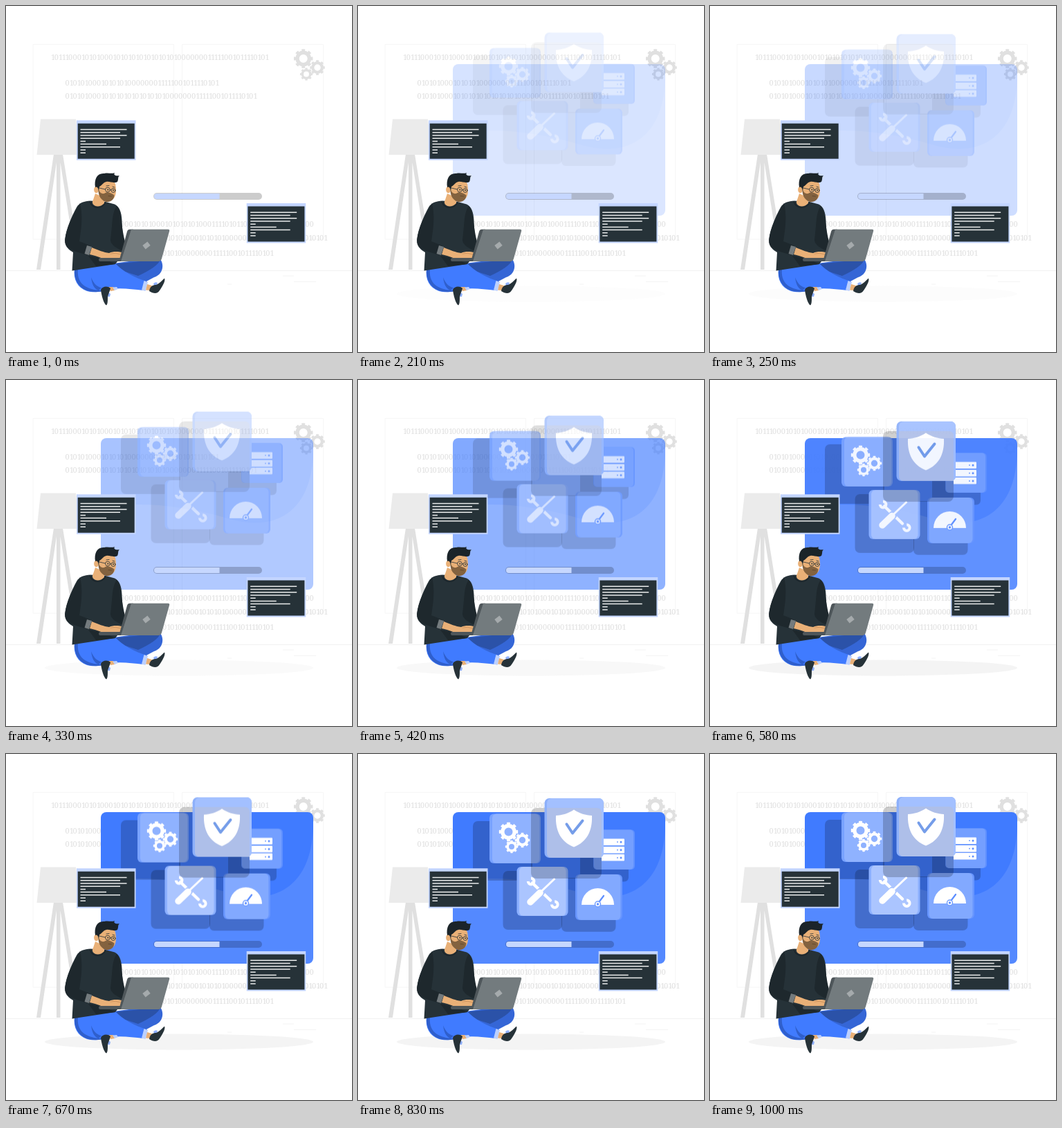
An HTML page that plays this animation: 500x500 px, repeating every 1.04 s.

```html
<!DOCTYPE html>
<html lang="en">
<head>
<meta charset="utf-8">
<title>Developer at work</title>
<style>
  html, body { margin: 0; width: 100%; height: 100%; overflow: hidden; background: #fff; }
  svg { display: block; width: 100%; height: 100%; }
  .fade { animation: fade 1040ms infinite; }
  .drop { animation: drop 1040ms infinite; }
  .fade, .drop { animation-timing-function: cubic-bezier(.3475, .072, .499, 1.369); }
  @keyframes fade {
    0% { opacity: 0; }
    92.98%, 100% { opacity: 1; }
  }
  @keyframes drop {
    0% { opacity: 0; transform: translateY(-30px); }
    92.98%, 100% { opacity: 1; transform: none; }
  }
  .bits { font: 300 11px "Noto Serif", serif; fill: #e0e0e0; }
  .ink { fill: #263238; }
  .skin { fill: #e9b077; }
  .line { fill: none; stroke-linecap: round; stroke-linejoin: round; }
  .shade { fill: #000; opacity: .2; }
</style>
</head>
<body>
<svg viewBox="0 0 500 500">
  <defs>
    <!-- outer radius 13.8, hole radius 6 -->
    <g id="gear" fill="none">
      <circle r="8.7" stroke-width="5.4"/>
      <circle r="12.200" stroke-width="3.200" pathLength="16" stroke-dasharray="1 1" transform="rotate(-11.250)"/>
    </g>
    <g id="terminal">
      <path fill="#c3d5ff" d="M0 0H85.500V57.500H0Z"/>
      <path class="ink" d="M1.700 4.500H83.700V55.500H1.700Z"/>
      <path stroke="#e9ebeb" stroke-width="1.500" d="M5.500 13.300h67M5.500 17.500h57.500M5.500 21.700h67M5.500 26h57.500M5.500 30.200h7.500M5.500 34.400h37.500M5.500 38.600h57.500M5.500 42.800h7.500M5.500 47h7.500"/>
    </g>
    <clipPath id="screen"><rect x="137" y="84" width="307" height="219" rx="8"/></clipPath>
  </defs>

  <!-- room -->
  <g fill="none" stroke="#f6f6f6">
    <path d="M39 55.500H242.500V337H39ZM254.500 55.500H458.500V337H254.500Z"/>
    <path stroke="#ebebeb" stroke-width=".7" d="M0 382.500H500"/>
    <path stroke="#f4f4f4" d="M400 390h16M416 398.500h32M320 402h6"/>
  </g>
  <g id="bits" class="bits"></g>
  <g stroke="#e0e0e0">
    <use href="#gear" transform="translate(429.700 76)"/>
    <use href="#gear" transform="translate(450 89) scale(.78)"/>
    <use href="#gear" transform="translate(434 98.500) scale(.66)"/>
  </g>
  <path fill="#e0e0e0" d="M69 214H82L109 381H103L78.500 226V381H73V226L50 381H44Z"/>
  <path fill="#ebebeb" d="M50 163.500H101L106.500 215H44.500Z"/>

  <g class="fade">
    <ellipse cx="250" cy="416" rx="194" ry="11.500" fill="#f4f4f4"/>
    <g clip-path="url(#screen)">
      <path fill="#407bff" d="M137 84H444V303H137Z"/>
      <path fill="#fff" opacity=".1" d="M137 187C185 174 250 180 320 200C385 220 441 195 444 105V303H137Z"/>
    </g>
  </g>

  <g class="drop">
    <!-- settings -->
    <rect class="shade" x="166" y="95" width="86" height="86" rx="7"/>
    <rect x="190" y="84.500" width="74" height="71.500" rx="6" fill="#78a2ff"/>
    <rect x="194" y="84.500" width="68" height="71.500" rx="6" fill="#8fb2ff"/>
    <g stroke="#fff">
      <use href="#gear" transform="translate(217.500 110.500)"/>
      <use href="#gear" transform="translate(237.500 122.500) scale(.78)"/>
      <use href="#gear" transform="translate(222 132) scale(.67)"/>
    </g>

    <!-- server -->
    <rect class="shade" x="321" y="113" width="70" height="69.500" rx="6"/>
    <rect x="340" y="107.500" width="60" height="57.500" rx="5" fill="#5f90ff"/>
    <rect x="341" y="107.500" width="57" height="57.500" rx="5" fill="#749fff"/>
    <path fill="#fff" d="M352 120.500h32q1 0 1 1v7.500q0 1-1 1h-32zm0 11.500h32q1 0 1 1v7.500q0 1-1 1h-32zm0 11h32q1 0 1 1v7.500q0 1-1 1h-32z"/>
    <path class="line" stroke="#5f90ff" stroke-width="3" d="M380 125.200h.01M380 136.700h.01M380 148h.01"/>
    <path class="line" stroke="#5f90ff" stroke-width="1.800" d="M375 125.200h.01M375 136.700h.01M375 148h.01"/>

    <!-- gauge -->
    <rect class="shade" x="294" y="177" width="78.500" height="78" rx="7"/>
    <rect x="314" y="172" width="68" height="66" rx="6" fill="#6795ff"/>
    <rect x="316.500" y="172" width="63" height="66" rx="6" fill="#82a9ff"/>
    <path fill="#fff" d="M323 216a23.500 24 0 0 1 47 0z"/>
    <path class="line" stroke="#5d8eff" stroke-width="2.200" d="M347.500 213L355 203"/>
    <circle cx="346.500" cy="215" r="4" fill="#fff" stroke="#6f9cff" stroke-width="1.500"/>
    <circle cx="346.500" cy="215" r="1.700" fill="#5d8eff"/>

    <!-- tools -->
    <rect class="shade" x="209.500" y="167" width="85.500" height="85" rx="7"/>
    <rect x="229.500" y="161" width="74" height="71" rx="6" fill="#8cb0ff"/>
    <rect x="233" y="161" width="67.500" height="71" rx="6" fill="#abc5ff"/>
    <g class="line" stroke="#fff">
      <path stroke-width="4.500" d="M252 184.500L278 209.500"/>
      <path stroke-width="4" stroke-linecap="butt" d="M250 177.800A4.300 4.300 0 1 1 245.800 182M280 215.500A4.300 4.300 0 1 0 284.200 211.300"/>
      <path stroke="#abc5ff" stroke-width="12" d="M264.500 197L249 212"/>
      <path stroke-width="3" stroke-linecap="butt" d="M284.500 178L265 196.500"/>
      <path stroke-width="9.500" d="M263 198.500L249 212"/>
    </g>

    <!-- shield -->
    <rect class="shade" x="250" y="76" width="102" height="102" rx="8"/>
    <rect x="269.500" y="62" width="85.500" height="86" rx="7" fill="#8db0fa"/>
    <rect x="273" y="62" width="82" height="86" rx="7" fill="#a3c0ff"/>
    <path fill="#aebfe9" d="M273 76H345q7 0 7 7V148H280q-7 0-7-7Z"/>
    <path fill="#fff" d="M312 78.500C304 84 295 86.500 286 87C285 109 293 125 312 132.500C331 125 339 109 338 87C329 86.500 320 84 312 78.500Z"/>
    <path class="line" stroke="#759de9" stroke-width="4" d="M301.500 99.500L310 112.500L324.500 94.500"/>
  </g>

  <!-- progress bar -->
  <rect class="shade" x="213" y="270" width="157" height="10" rx="5"/>
  <path fill="#c6d7ff" d="M218 271H308.500V279H218a4 4 0 0 1 0-8Z"/>

  <use href="#terminal" x="102" y="165.200"/>
  <use href="#terminal" x="347.700" y="285"/>

  <!-- legs -->
  <path fill="#3566d6" d="M146 374C175 368 210 366 223 366C229 374 227 388 214 392L199 400L150 406L125 400Z"/>
  <path fill="#2b52a8" d="M146 374L223 366C221 374 208 382 191 390L160 380Z"/>
  <path fill="#407bff" d="M99 380L158 372C168 383 186 393 204 398L199 411C182 409 167 407 150 409C138 414 125 414 117 412C103 407 97 395 99 380Z"/>
  <path fill="#2f5fcc" d="M99 381C98 397 107 410 122 412.500C130 414 138 413 143 411C130 411.500 119 409 111.500 403C105 397 103 389 104 380ZM123 392C126 400 131 406 138 407L134 411C127 409 124 401 123 392Z"/>
  <path fill="#bcd0ff" d="M199.500 397L205 399L201.500 412L196 410.500Z"/>
  <path class="skin" d="M204 402L211 404L209 411L202 410.500ZM148 406L155 406L157 411L151 412Z"/>
  <path fill="#bcd0ff" d="M154 406.500L160 406L162 409L157 411Z"/>
  <path fill="#8fb0ff" d="M213 401q3-3 6-1l-1 3-4 1zM148 414l3 2-1 4-3 0z"/>
  <path class="ink" d="M207 412C208 405 212 403 217 403C222 401 226 396 229 393.500C231 397 226 405 222 411C219 416.500 213 416 207 412Z"/>
  <path class="ink" d="M137 410C139 405 147 404 151 408C150 412 148 416 147 420C147 426 147 431 145 432.500C141 430 138 418 137 410Z"/>

  <!-- body -->
  <path class="ink" d="M122 281.500C113 282 106 284 102 291C95 304 87 322 85.300 337C84 348 92 353 97 356L95.500 382.500L158 373L174 352C169 340 168 325 167.500 310C167 298 164 290 157 286.500L144 283Z"/>
  <path fill="#1e282d" d="M107 285C96 302 87 322 85.300 337C84 351 96 354 119 360L123 347L106 340C108 325 112 306 107 285ZM153 318C154 303 156 294 160 289C168 296 166 322 173 343L168 354C160 350 151 345 151 338ZM119 361L141 365L158 373L130 376Z"/>
  <path class="skin" d="M129 271L126 280C121 288 134 294 142 285L142 277Z"/>
  <path class="line" stroke="#1b2429" stroke-width="1.200" d="M121 282.500C125 294 138 294 143.500 284.500"/>

  <!-- head -->
  <path class="skin" d="M135 256C140 249 155 250 158 257C159 263 160 270 157 276C153 283 144 284 138 279C134 274 133 265 135 256Z"/>
  <ellipse class="skin" cx="130.500" cy="265.500" rx="3.400" ry="4.800"/>
  <path fill="#83623f" d="M133.500 262C134 268 137 272 142 271C147 267 153 271 156.500 273.500C156 281 150 284 144 283C136 280 132.500 272 133.500 262Z"/>
  <path class="line" stroke="#5d4329" stroke-width=".8" d="M148 274.500L152.500 275"/>
  <path fill="#1b2429" d="M129 262C127 250 132 241 142 242C148 240.500 152 243 157 241C155 244 158 246 164 245C161 248 163 250 161 254C156 257 150 253 145 254C140 255 139 259 135 261L134 267C133 261 130 261 129 262Z"/>
  <g class="line" stroke="#263238" stroke-width=".8">
    <circle cx="147" cy="265.500" r="3.400"/>
    <circle cx="155" cy="266.500" r="3"/>
    <path d="M135 263L143.600 265M150.400 265.700L152 266M145 260L149 259.500M154 261L157 262"/>
  </g>
  <path class="ink" d="M146.500 264.500h1.600v2h-1.600zM154.300 265.300h1.500v2h-1.500z"/>

  <!-- hands and laptop -->
  <path fill="#747b7e" d="M117 346L124 348L120 360L113.500 358Z"/>
  <path class="skin" d="M124 349C134 353 141 356 149 357C155 354 163 355 168 356L166 364L140 365C133 362 126 360 121 359Z"/>
  <path class="line" stroke="#ca8d58" stroke-width=".8" d="M151 358Q158 356 166 359"/>
  <path fill="#4e565a" d="M136 364H166V369H136q-2 0-2-2.500t2-2.500ZM179 322.800H184L170 369H166q-3 0-2-3L175 326q1-3.200 4-3.200Z"/>
  <path fill="#737b7e" d="M181 322.800H234q3 0 2 3L225 365q-1 4-5 4H166Z"/>
  <rect x="-4.500" y="-3.500" width="9" height="7" fill="#a5aaac" transform="translate(203 346) rotate(-38)"/>
</svg>
<script>
  const pairs = n => "10".repeat(n);
  const tail = "000000" + "11111" + "00" + "10" + "1111" + "0101";
  const rows = [
    [65, 78, "1011100010101000" + pairs(9) + tail],
    [85.5, 115, "010101000" + pairs(4) + tail],
    [85.5, 134, "010101000" + pairs(9) + tail],
    [165, 319, "00010101000" + pairs(4) + "1000" + "1111" + "0101" + pairs(8) + "000"],
    [233, 339, "1010100010101" + "01000000" + "111110010111101010101"],
    [226, 361, "010100" + tail]
  ];
  const advance = { 0: 6.3, 1: 4.7 };
  const layer = document.getElementById("bits");

  for (const [left, y, digits] of rows) {
    let x = left;
    const text = document.createElementNS("http://www.w3.org/2000/svg", "text");
    const stops = [...digits].map(d => {
      const at = x;
      x += advance[d];
      return at.toFixed(2);
    });
    text.setAttribute("x", stops.join(" "));
    text.setAttribute("y", y);
    text.textContent = digits;
    layer.append(text);
  }
</script>
</body>
</html>
```
